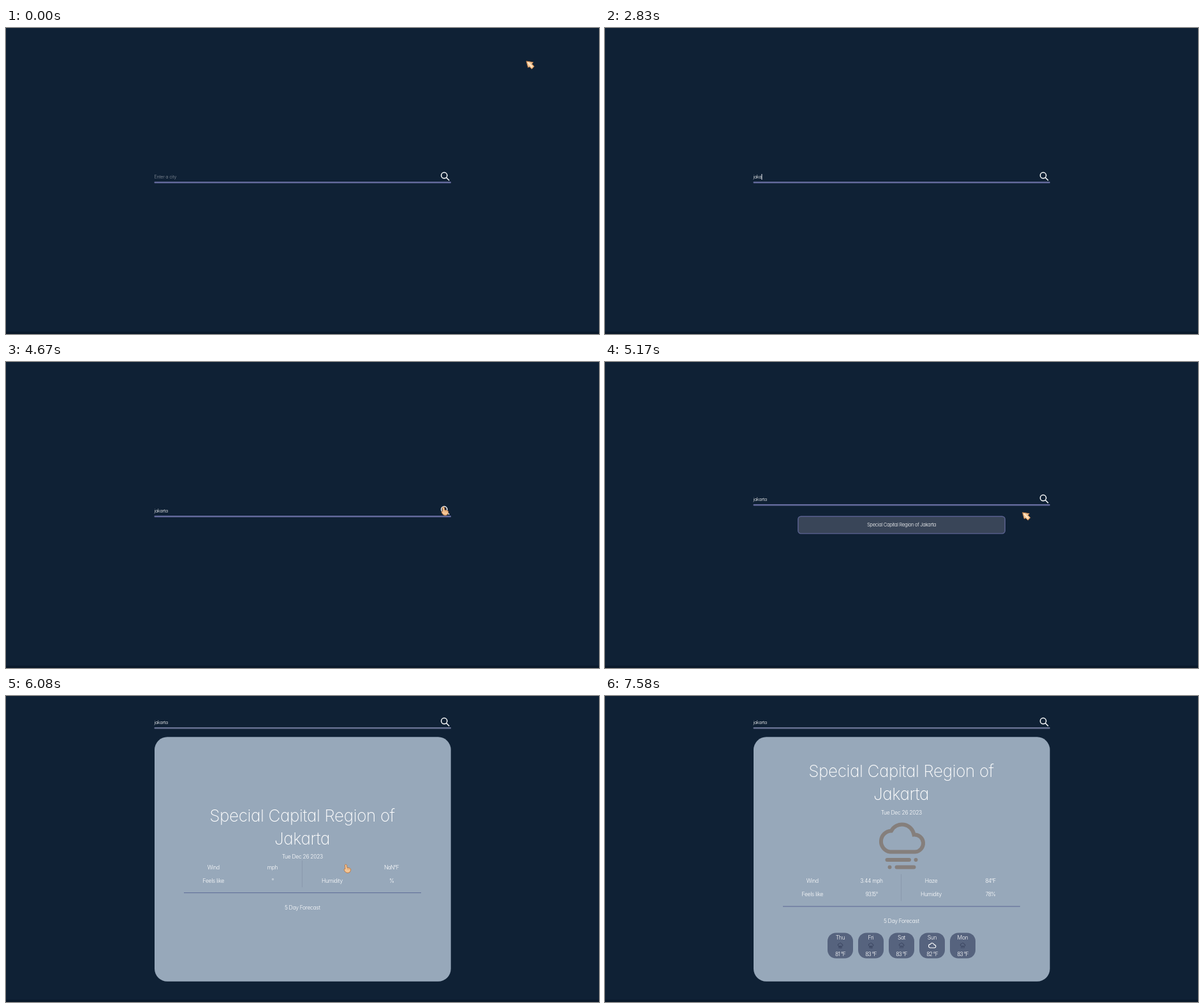
An HTML page that plays this animation: 930 px wide and 480 px high, repeating every 8 s.

```html
<!DOCTYPE html>
<html lang="en">
<head>
<meta charset="utf-8">
<title>City weather</title>
<style>
html, body { margin: 0; width: 100%; height: 100%; overflow: hidden; background: #0f2135; }
svg { display: block; width: 930px; height: 480px; }
text {
  font-family: Inter, Roboto, "Noto Sans", sans-serif;
  font-feature-settings: "cv11";
  font-weight: 300;
  fill: #fff;
}
.field { font-size: 7.2px; letter-spacing: -.25px; }
.item { font-size: 7.6px; letter-spacing: -.3px; }
.title { font-size: 26px; font-weight: 200; letter-spacing: -.35px; }
.body { font-size: 8.5px; letter-spacing: -.3px; }
.tight { letter-spacing: -.8px; }
.mid text { text-anchor: middle; }
</style>
</head>
<body>
<svg viewBox="0 0 930 480">
  <defs>
    <path id="cloud" fill="none" d="M447 244.5A16.6 16.6 0 0 1 449 211.5A19 19 0 0 1 484.5 217.5A13.5 13.5 0 0 1 486.5 244.5Z"/>
    <path id="fog" fill="none" stroke-linecap="round" d="M442.500 257H477M487.500 257h.01M446.500 268.500h.01M457.500 268.500H484.500"/>
    <path id="rain" fill="none" stroke-linecap="round" d="M448 256l-4 13M467 256l-4 13M486 256l-4 13"/>
  </defs>
  <rect width="930" height="480" fill="#0f2135"/>
  <rect y="476.500" width="930" height="3.500" fill="#0a192a"/>

  <g id="search">
    <text id="typed" class="field" x="232.500" y="236"></text>
    <rect id="caret" y="229" width="1" height="9" fill="#e8ebef"/>
    <rect id="rule" x="232.500" y="241" width="465.500" height="2.600" rx="1"/>
    <g fill="none" stroke="#fff" stroke-width="1.500">
      <circle cx="687.200" cy="231.200" r="4.600"/>
      <path d="M690.500 234.500L695.200 239.200"/>
    </g>
  </g>

  <g id="result" class="mid">
    <rect x="302.800" y="242.300" width="324.500" height="26.800" rx="4.500" fill="#394558" stroke="#5c6392" stroke-width="1.400"/>
    <text class="item" x="465" y="258.200">Special Capital Region of Jakarta</text>
  </g>

  <g id="card" class="mid">
    <rect x="233" y="64.300" width="464.700" height="383.500" rx="20" fill="#97a8ba"/>
    <g id="head">
      <text class="title" x="464.500" y="127">Special Capital Region of</text>
      <text class="title" x="464.500" y="163">Jakarta</text>
      <text class="body" x="464.800" y="185.500">Tue Dec 26 2023</text>
    </g>
    <g id="facts">
      <rect x="464" y="279.500" width="1" height="42" fill="#8a98ac"/>
      <rect x="279" y="329.500" width="372" height="1.200" fill="#65739c"/>
    </g>
    <g id="extra"></g>
  </g>

  <g id="arrow">
    <path d="M0 0L10.800 1.800L8.700 4.300L12.300 8.200L8.600 12.200L5 8.700L2.800 10Z" fill="#f5c898" stroke="#b97a46" stroke-width="1" stroke-linejoin="round"/>
    <path d="M3 2.600L8.500 8.400" stroke="#fff0d8" stroke-width="1.500" stroke-linecap="round"/>
  </g>
  <g id="hand">
    <path d="M-1.500 1Q0 -1 1.300 1L2 5.300L6.300 6Q8.200 6.800 7.600 9.600Q7 13.500 3 13.500Q-.2 13.500 -1.600 11L-3 8.300Q-3 6.800 -1 7.600Z" fill="#f4c696" stroke="#b9743f" stroke-width=".9" stroke-linejoin="round"/>
    <path d="M2.300 6.200v2.300M4.300 6.500v2M6 6.900v1.700" stroke="#c98a52" stroke-width=".6"/>
  </g>
</svg>
<script>
const NS = 'http://www.w3.org/2000/svg';
const LOOP = 8000, TICK = 1000 / 12;
const $ = id => document.getElementById(id);

function add(parent, tag, attrs, label) {
  const el = document.createElementNS(NS, tag);
  for (const key in attrs) el.setAttribute(key, attrs[key]);
  if (label) el.textContent = label;
  parent.appendChild(el);
  return el;
}

function label(parent, x, y, str, tight) {
  return add(parent, 'text', { x, y, class: tight ? 'body tight' : 'body' }, str);
}

// Cloud symbol with an optional second part below it
function icon(parent, below, x, y, scale, color, weight) {
  const g = add(parent, 'g', {
    transform: `translate(${x} ${y}) scale(${scale}) translate(-465 -234)`,
    stroke: color, 'stroke-width': weight
  });
  add(g, 'use', { href: '#cloud' });
  if (below) add(g, 'use', { href: '#' + below });
}

const facts = $('facts'), extra = $('extra');
label(facts, 325.3, 293, 'Wind');
label(facts, 325.3, 314, 'Feels like');
label(facts, 511.5, 314, 'Humidity');
label(facts, 464.8, 356, '5 Day Forecast');
const wind = label(facts, 418, 293);
const feels = label(facts, 418, 314, '', true);
const sky = label(facts, 511.5, 293);
const temp = label(facts, 604.5, 293, '', true);
const humid = label(facts, 604.5, 314, '', true);

icon(extra, 'fog', 465, 234, 1, '#857f7c', 6);
[['Thu', 81, 'fog'], ['Fri', 83, 'fog'], ['Sat', 83, 'rain'], ['Sun', 82, ''], ['Mon', 83, 'rain']]
  .forEach(([day, deg, below], i) => {
    const x = 369 + i * 48;
    add(extra, 'rect', { x: x - 20, y: 371.5, width: 40, height: 40, rx: 13, fill: '#56637e' });
    label(extra, x, 382, day);
    if (below) icon(extra, below, x, 391.2, .115, '#37415c', 8);
    else icon(extra, '', x, 393.2, .17, '#fff', 6.5);
    label(extra, x, 407.6, deg + ' °F', true);
  });

// Ticks at which each letter arrives
const word = 'jakarta', keys = [29, 31, 32, 34, 37, 38, 39];

// Pointer strokes: points are [tick, x, y], kind gives the visible shape
const strokes = [
  { end: 10, kind: () => 'arrow',
    pts: [[0, 816, 52], [2, 829, 15], [4, 700, 66], [7, 420, 176], [9, 240, 222]] },
  { end: 73, kind: (n, x) => n < 53 || (n > 60 && x > 626) ? 'arrow' : 'hand',
    pts: [[48, 255, 221], [50, 430, 201], [52, 620, 207], [54, 686, 227], [60, 686, 227], [66, 592, 254], [69, 533, 264]] },
  { end: 91, kind: (n, x, y) => n < 80 ? 'hand' : y > 92 && y < 180 ? '' : 'arrow',
    pts: [[73, 533, 264], [79, 533, 264], [80, 543, 262], [84, 464, 213], [85, 464, 213], [90, 364, 51]] }
];

function along(pts, n) {
  let i = 0;
  while (i < pts.length - 2 && n >= pts[i + 1][0]) i++;
  const [a, ax, ay] = pts[i], [b, bx, by] = pts[i + 1];
  const k = Math.min(1, (n - a) / (b - a));
  return [ax + (bx - ax) * k, ay + (by - ay) * k];
}

const show = (el, on) => el.setAttribute('visibility', on ? 'visible' : 'hidden');
const move = (el, x, y) => el.setAttribute('transform', `translate(${x} ${y})`);
const within = (n, a, b) => n >= a && n < b;

function drawPointer(n) {
  const stroke = strokes.find(s => within(n, s.pts[0][0], s.end));
  let kind = '', x = 0, y = 0;
  if (stroke) {
    [x, y] = along(stroke.pts, n);
    kind = stroke.kind(n, x, y);
  }
  for (const id of ['arrow', 'hand']) {
    show($(id), kind === id);
    move($(id), x, y);
  }
}

function drawSearch(n) {
  const typed = $('typed'), caret = $('caret');
  const str = word.slice(0, keys.filter(k => n >= k).length);
  typed.textContent = str || 'Enter a city';
  typed.style.fill = str ? '#fff' : '#8a929d';
  show(caret, within(n, 14, 21) || within(n, 27, 46) || within(n, 52, 56));
  caret.setAttribute('x', str ? 232.4 + typed.getComputedTextLength() : 232.8);
  move($('search'), 0, n < 58 ? 0 : n < 73 ? -18 : -192);
  $('rule').setAttribute('fill', n < 73 ? '#636a9b' : '#667091');
}

function drawCard(n) {
  const ready = n >= 74;
  show($('result'), within(n, 58, 73));
  $('card').style.display = n >= 73 ? '' : 'none';
  extra.style.display = ready ? '' : 'none';
  move($('head'), 0, ready ? 0 : 69.8);
  move(facts, 0, ready ? 0 : -21.5);
  wind.textContent = ready ? '3.44 mph' : 'mph';
  feels.textContent = ready ? '93.15°' : '°';
  sky.textContent = ready ? 'Haze' : '';
  temp.textContent = ready ? '84°F' : 'NaN°F';
  humid.textContent = ready ? '78%' : '%';
}

function render(ms) {
  const n = Math.floor((ms % LOOP + 4) / TICK) % 96;
  drawSearch(n);
  drawCard(n);
  drawPointer(n);
}

const start = performance.now();
function loop() {
  render(performance.now() - start);
  requestAnimationFrame(loop);
}
loop();
</script>
</body>
</html>
```
